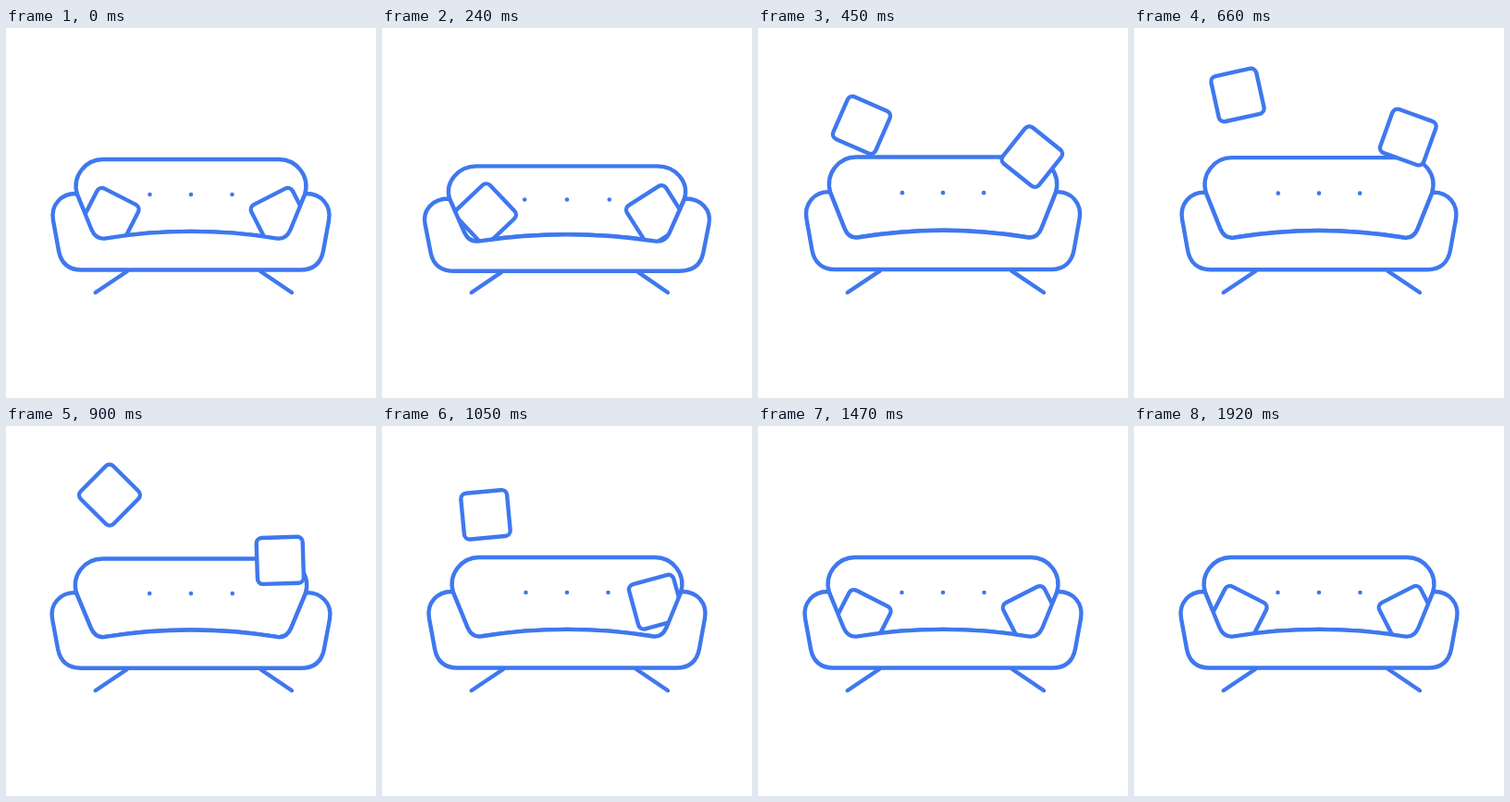
Recreate the animation shown at these times as an HTML page with a canvas. Size 400 by 400 pixels, loop 6.95 s.

```html
<!DOCTYPE html>
<html lang="en">
<head>
<meta charset="utf-8">
<title>Sofa</title>
<style>
  html, body { margin: 0; width: 100%; height: 100%; overflow: hidden; background: #fff; }
  canvas { display: block; width: 400px; height: 400px; }
</style>
</head>
<body>
<canvas id="stage" width="400" height="400"></canvas>
<script>
const ctx = document.getElementById('stage').getContext('2d');
const LOOP = 6950, STEP = 30, SETTLED = 1920;
const BLUE = '#3f78ee', GROUND = 286, SEAT = 204.5, LAUNCH = 235;
const { PI, sin, cos, min, max, floor } = Math;
const clamp = v => min(1, max(0, v));

const pillows = [
  { x: 112, top: 70, apex: 790, fall: 593, power: 2.75, sink: 5,
    angle: 27, spin: 360, turnStart: 185, turnTime: 1285, sway: 0.045 },
  { x: 296.3, top: 118, apex: 660, fall: 427, power: 2, sink: 2,
    angle: -27, spin: -90, turnStart: 180, turnTime: 1000, sway: 0 }
];

// The sofa is pressed down, then springs back with fading swings.
function squash(t) {
  if (t < LAUNCH) return sin(PI / 2 * t / LAUNCH) ** 2;
  const u = t - LAUNCH;
  return cos(2 * PI * u / 650) * max(0, 1 - u / 1050) ** 1.6;
}

// Thrown up, slowing to the apex, falling back and sinking into the seat.
function height(p, t) {
  const land = p.apex + p.fall;
  if (t < LAUNCH) return SEAT;
  if (t > land) {
    const u = t - land;
    return SEAT + p.sink * sin(PI * u / 180) * max(0, 1 - u / 540);
  }
  const drop = t < p.apex
    ? ((p.apex - t) / (p.apex - LAUNCH)) ** p.power
    : ((t - p.apex) / p.fall) ** 2;
  return p.top + (SEAT - p.top) * drop;
}

function angle(p, t) {
  const u = clamp((t - p.turnStart) / p.turnTime);
  const turned = u + p.sway * sin(2 * PI * u) * (1 - u);
  return (p.angle + p.spin * turned) * PI / 180;
}

function drawPillow(p, t) {
  ctx.save();
  ctx.translate(p.x, height(p, t));
  ctx.rotate(angle(p, t));
  ctx.beginPath();
  ctx.roundRect(-25, -25, 50, 50, 6);
  ctx.fill();
  ctx.stroke();
  ctx.restore();
}

// Builds a path in sofa space, then paints it with an even line.
function shape(sx, sy, build) {
  ctx.save();
  ctx.translate(200, GROUND);
  ctx.scale(sx, sy);
  ctx.translate(-200, -GROUND);
  ctx.beginPath();
  build();
  ctx.closePath();
  ctx.restore();
  ctx.fill();
  ctx.stroke();
}

// From the right armrest down, along the seat and up to the left armrest.
function innerEdge() {
  ctx.lineTo(307.5, 218);
  ctx.bezierCurveTo(304.5, 225, 300, 228.8, 292, 227.3);
  ctx.bezierCurveTo(232, 217.6, 168, 217.6, 108, 227.3);
  ctx.bezierCurveTo(100, 228.8, 95.5, 225, 92.5, 218);
  ctx.lineTo(77, 180);
}

function back() {
  ctx.moveTo(105, 142);
  ctx.lineTo(295, 142);
  ctx.bezierCurveTo(314, 142, 329, 160, 323, 180);
  innerEdge();
  ctx.bezierCurveTo(71, 160, 86, 142, 105, 142);
}

function front() {
  ctx.moveTo(76.5, 179);
  ctx.bezierCurveTo(59, 178.5, 48, 192, 51, 208);
  ctx.lineTo(57, 241);
  ctx.bezierCurveTo(59.5, 254, 68, 261.5, 82, 261.5);
  ctx.lineTo(318, 261.5);
  ctx.bezierCurveTo(332, 261.5, 340.5, 254, 343, 241);
  ctx.lineTo(349, 208);
  ctx.bezierCurveTo(352, 192, 341, 178.5, 323.5, 179);
  innerEdge();
}

function draw(t) {
  const q = squash(t), sx = 1 + 0.03 * q, sy = 1 - 0.052 * q;
  const px = x => 200 + (x - 200) * sx;
  const py = y => GROUND + (y - GROUND) * sy;

  ctx.fillStyle = '#fff';
  ctx.fillRect(0, 0, 400, 400);
  ctx.strokeStyle = BLUE;
  ctx.lineWidth = 4.4;
  ctx.lineCap = ctx.lineJoin = 'round';

  for (const [hip, foot] of [[131, 96.7], [275, 309]]) {
    ctx.beginPath();
    ctx.moveTo(px(hip), py(263));
    ctx.lineTo(foot, GROUND);
    ctx.stroke();
  }

  shape(sx, sy, back);
  ctx.fillStyle = BLUE;
  for (const side of [-1, 0, 1]) {
    ctx.beginPath();
    ctx.arc(px(200 + 44.5 * side), py(180), 2.3, 0, 2 * PI);
    ctx.fill();
  }

  ctx.fillStyle = '#fff';
  for (const p of pillows) drawPillow(p, t);
  shape(sx, sy, front);
}

const start = performance.now();
function tick() {
  const t = (performance.now() - start) % LOOP;
  draw(min(SETTLED, floor(t / STEP) * STEP));
  requestAnimationFrame(tick);
}
tick();
</script>
</body>
</html>
```
